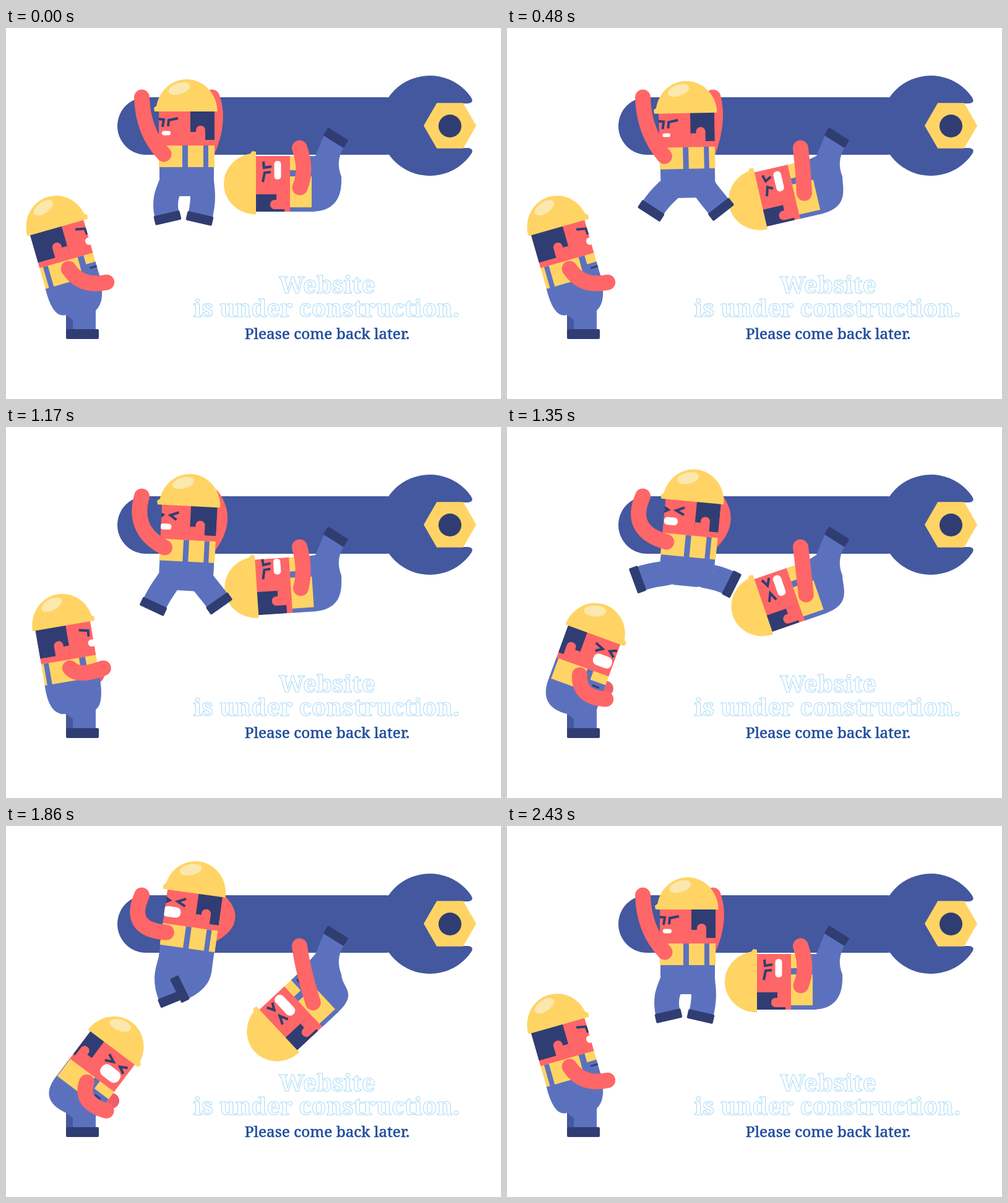
An HTML page with a canvas that plays this animation: 800 px wide and 600 px high, repeating every 2700 ms.

```html
<!DOCTYPE html>
<html lang="en">
<head>
<meta charset="utf-8">
<title>Under construction</title>
<style>
  html, body { margin: 0; overflow: hidden; background: #fff; }
  canvas { display: block; }
</style>
</head>
<body>
<canvas id="stage" width="800" height="600"></canvas>
<script>
const c = document.getElementById('stage').getContext('2d');
const STEEL = '#43589f', DENIM = '#5c71be', NAVY = '#303d73', SKIN = '#ff6667',
      SHADE = '#ee5f6b', YELLOW = '#ffd464', SHINE = '#fbe8ae', WHITE = '#fff';
const rad = deg => deg * Math.PI / 180;
const clamp = v => Math.max(0, Math.min(1, v));
const smooth = v => (v = clamp(v), v * v * (3 - 2 * v));

// Effort of each worker over time: [ms, value, ...]
const PULL = [ // pull-up height, kick of the left and the right leg
  [0, 0, 0, 0], [240, .9, .9, .9], [480, -.1, .5, .6], [960, 0, -.2, .15],
  [1350, .55, .9, .9], [1860, 1, -.1, -.6], [2160, .2, 1, 1], [2430, 0, 0, 0]];
const DROP = [ // degrees below level
  [0, 0], [300, 19], [480, 13], [720, 0], [1080, 0], [1350, 19], [1860, 43], [2160, 30], [2430, 0]];
const LEAN = [ // degrees forward
  [0, -16], [570, -16], [780, -32], [960, -24], [1080, -21], [1350, 20], [1860, 37], [2130, -16], [2430, -16]];

// Pause for breath in which everyone turns the head away.
const breath = t => smooth((t - 570) / 390) * smooth((1320 - t) / 360);

// Smooth interpolation that never overshoots a key.
function track(keys, t) {
  const last = keys.length - 1;
  let i = 0;
  while (i < last - 1 && t >= keys[i + 1][0]) i++;
  const span = keys[i + 1][0] - keys[i][0], u = (t - keys[i][0]) / span, v = 1 - u;
  const slope = (k, j) => k < 0 || k >= last ? 0 : (keys[k + 1][j] - keys[k][j]) / (keys[k + 1][0] - keys[k][0]);
  const tangent = (k, j) => {
    const p = slope(k - 1, j), q = slope(k, j);
    return p * q <= 0 ? 0 : 2 * p * q / (p + q);
  };
  return keys[i].slice(1).map((from, n) => {
    const j = n + 1;
    return from + (keys[i + 1][j] - from) * smooth(u)
      + span * u * v * (v * tangent(i, j) - u * tangent(i + 1, j));
  });
}

function box(color, x, y, w, h, r = 0) {
  c.fillStyle = color;
  c.beginPath();
  c.roundRect(x, y, w, h, r);
  c.fill();
}

function fill(color, draw) {
  c.fillStyle = color;
  c.beginPath();
  draw();
  c.fill();
}

function line(color, width, draw, cap = 'butt') {
  c.strokeStyle = color;
  c.lineWidth = width;
  c.lineCap = cap;
  c.beginPath();
  draw();
  c.stroke();
}

const arm = (color, from, bend, to) => line(color, 25, () => {
  c.moveTo(...from);
  c.quadraticCurveTo(...bend, ...to);
}, 'round');

// Bodies have their origin in the middle of the waist; -x is the front.
function enter(b) {
  c.save();
  c.translate(b.x, b.y);
  c.rotate(rad(b.tilt));
  c.scale(b.flip, 1);
}

function at(b, x, y) {
  const s = Math.sin(rad(b.tilt)), k = Math.cos(rad(b.tilt));
  x *= b.flip;
  return [b.x + x * k - y * s, b.y + x * s + y * k];
}

function shoe(x, y, angle, w = 43) {
  c.save();
  c.translate(x, y);
  c.rotate(rad(angle));
  box(NAVY, -w / 2, -7.5, w, 15, 2);
  c.restore();
}

// An eye changes from an angry brow to a squeezed wedge.
function eye(x, open, shut, squint) {
  line(NAVY, 4, () => open.forEach(([px, py], i) => c.lineTo(
    x + px + (shut[i][0] - px) * squint, -73 + py + (shut[i][1] - py) * squint)));
}

function head({ turn, squint, mouth: [w, h] }) {
  box(SKIN, -45, -91, 90, 56);
  box(NAVY, 6 - turn, -91, 39 + turn, 47);
  box(SKIN, 6 - turn, -57, 10, 14);
  box(SKIN, 15 - turn, -67, 15, 32, [7, 7, 0, 0]);
  eye(-22 - turn + 2 * squint, [[-8, 7], [-7, -3], [8, -6]], [[7, 6], [-6, 0], [7, -6]], squint);
  eye(-41 - turn - 3 * squint, [[2, 8], [4, -4], [-6, -5]], [[-6, 6], [5, 0], [-6, -6]], squint);
  box(WHITE, -33 - turn - w / 2, -55 - h / 2, w, h, Math.min(w, h) * .45);
}

function shirt({ bib, twist }) {
  box(YELLOW, -45, -36, 90, 36);
  if (bib) {
    box(DENIM, -29 + twist, -35, 10, 36);
    box(DENIM, -45, -20, 26 + twist, 21);
    box(DENIM, 31 + twist, -35, 8, 36);
    box(NAVY, -45 + twist * .8, -14, 12, 3);
  } else {
    box(DENIM, -7, -35, 9, 36);
    box(DENIM, 27, -35, 8, 36);
  }
}

function upperBody(b, face) {
  enter(b);
  c.save();
  c.beginPath();
  c.rect(-45, -91, 90, 92);
  c.clip();
  shirt(b);
  head(face);
  c.restore();
  fill(YELLOW, () => {
    c.ellipse(0, -90, 49.5, 52, 0, Math.PI, 0);
    c.lineTo(-52, -90);
    c.lineTo(-53, -96);
    c.lineTo(-44, -103);
  });
  if (b.shine) {
    c.scale(b.flip, 1);
    fill(SHINE, () => c.ellipse(-12, -127, 18, 9, rad(-18), 0, 7));
  }
  c.restore();
}

function wrench() {
  box(STEEL, 180, 112, 480, 93, 46.5);
  fill(STEEL, () => {
    c.moveTo(697, 122);
    c.lineTo(746, 122);
    c.quadraticCurveTo(757, 121, 752, 113);
    c.arc(685, 158, 81, rad(-34), rad(34), true);
    c.quadraticCurveTo(757, 195, 746, 194);
    c.lineTo(697, 194);
    c.lineTo(680, 158);
  });
  fill(YELLOW, () => {
    for (let i = 0; i < 6; i++) c.lineTo(717.5 + 42.5 * Math.cos(rad(60 * i)), 158 + 42.5 * Math.sin(rad(60 * i)));
  });
  fill(NAVY, () => c.arc(717.5, 158.5, 18.5, 0, 7));
}

function drawHanging(t) {
  const [pull, left, right] = track(PULL, t);
  const turn = 10 * breath(t);
  const b = { x: 292 + pull, y: 225 - 27 * pull, tilt: pull * (12 - 4 * pull), flip: 1, shine: true };
  arm(SKIN, [333, 112], [347 + 38 * pull + turn, 150], at(b, 33, -25));
  const legs = [
    { hip: -24, x: b.x - 31 - 56 * left, y: b.y + 82 - 56 * left ** 2, angle: 92 * left - 13 },
    { hip: 24, x: b.x + 21 + 55 * right, y: b.y + 83 - 48 * right ** 2, angle: 13 - 85 * right }];
  for (const { hip, x, y, angle } of legs) {
    const nx = -Math.sin(rad(angle)), ny = Math.cos(rad(angle));
    line(DENIM, 40, () => {
      c.moveTo(...at(b, hip, 20));
      c.bezierCurveTo(...at(b, hip, 33), x - nx * 38, y - ny * 38, x - nx * 4, y - ny * 4);
    });
  }
  enter(b);
  box(DENIM, -44, -1, 88, 34, [0, 0, 16, 16]);
  box(DENIM, -28, 20, 56, 27, 10);
  c.restore();
  for (const { x, y, angle } of legs) shoe(x, y, angle);
  upperBody(b, { turn, squint: clamp(3 * pull), mouth: [14 + 15 * pull, 7 + 10 * pull] });
  arm(SKIN, [219.5, 112], [221 - 26 * smooth(pull / .55) - 1.3 * turn, 168], at(b, -37, -21));
}

function drawSitUp(t) {
  const [drop] = track(DROP, t), rest = breath(t);
  const b = { x: 494 + .28 * drop, y: 252 + .38 * drop, tilt: -90 - drop, flip: -1, bib: true, twist: 7 };
  fill(DENIM, () => {
    c.moveTo(...at(b, -45, -1));
    c.lineTo(...at(b, 45, -1));
    c.bezierCurveTo(...at(b, 45, 46), 543, 262, 542, 240);
    c.quadraticCurveTo(532, 215, 546, 193);
    c.lineTo(514, 173);
    c.lineTo(500, 207);
  });
  shoe(533, 177.5, 32, 39);
  upperBody(b, {
    turn: 25 * rest - 11, squint: clamp((drop - 10) / 8),
    mouth: [30 + .23 * drop - 14 * rest, 11 + .12 * drop] });
  arm(SKIN, [474.5, 194], [487 - 8 * clamp(drop / 13), 230], at(b, 6, -19));
}

function drawBending(t) {
  const [tilt] = track(LEAN, t);
  const wipe = breath(t), hug = clamp((tilt + 16) / 45), reach = Math.max(wipe, hug);
  const b = {
    x: 107 + .008 * Math.max(0, tilt) ** 2, y: 413 + .3 * tilt + .005 * tilt ** 2,
    tilt, flip: -1, bib: true, twist: 13 * hug, shine: true };
  arm(SHADE, at(b, -20, -12), at(b, -27, -12), at(b, -34 - 16 * reach, 9 - 30 * reach));
  box(STEEL, 97, 455, 14, 34);
  fill(DENIM, () => {
    c.moveTo(...at(b, 45, -1));
    c.quadraticCurveTo(...at(b, 47, 50), 97, 464);
    c.lineTo(108, 472);
    c.lineTo(108, 488);
    c.lineTo(145, 488);
    c.lineTo(145, 457);
    c.quadraticCurveTo(...at(b, -45, 45), ...at(b, -45, -1));
  });
  box(NAVY, 97, 487, 53, 16, 2);
  upperBody(b, {
    turn: 14 - 25 * hug, squint: hug,
    mouth: [18 + 17 * hug - 12 * wipe, 12 + 9 * hug - 6 * wipe] });
  arm(SKIN, at(b, 0, -21), at(b, -11, 14 - 46 * wipe), at(b, -53, 17 - 69 * wipe - 20 * hug));
}

function drawText() {
  c.textAlign = 'center';
  c.font = 'bold 38.5px "Noto Serif", serif';
  c.strokeStyle = '#9ad4f7';
  c.lineWidth = 1;
  c.setLineDash([2, 1]);
  c.strokeText('Website', 519, 429);
  c.strokeText('is under construction.', 518, 467);
  c.setLineDash([]);
  c.font = '24.4px "Noto Serif", serif';
  c.fillStyle = c.strokeStyle = '#1f4c9c';
  c.lineWidth = .6;
  c.fillText('Please come back later.', 519, 503);
  c.strokeText('Please come back later.', 519, 503);
}

function frame() {
  const t = Math.min(Math.floor(performance.now() % 2700 / 30) * 30, 2430);
  c.fillStyle = WHITE;
  c.fillRect(0, 0, 800, 600);
  wrench();
  drawSitUp(t);
  drawHanging(t);
  drawBending(t);
  drawText();
  requestAnimationFrame(frame);
}
frame();
</script>
</body>
</html>
```
